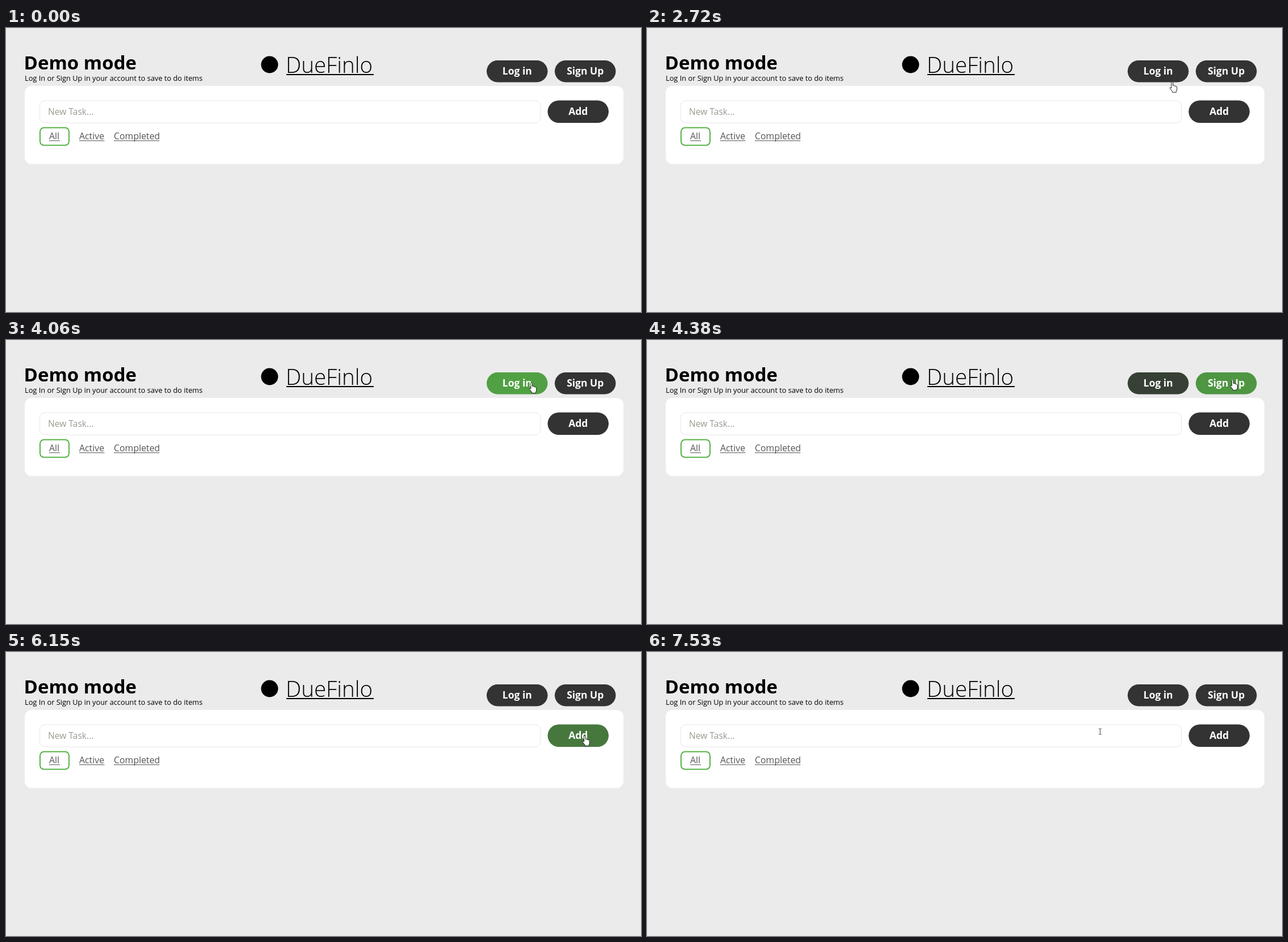
Recreate the animation shown at these times as an HTML page. Size 1119 by 500 pixels, loop 8 s.

```html
<!DOCTYPE html>
<html lang="en">
<head>
<meta charset="utf-8">
<title>Task list</title>
<style>
  html, body { margin: 0; width: 100%; height: 100%; overflow: hidden; background: #ebebeb; }
  svg { display: block; width: 100%; height: 100%; font-family: "Open Sans", "Noto Sans", sans-serif; }
  .button text { font-size: 17.5px; font-weight: 700; fill: #fff; text-anchor: middle; }
  .link { font-size: 15.9px; }
  .cursor path { fill: #fff; stroke: #1c1c1c; stroke-width: 1; stroke-linejoin: round; }
  .cursor #beam { fill: none; stroke: #444; }
</style>
</head>
<body>
<svg id="stage" viewBox="0 0 1119 500">
  <rect width="1119" height="500" fill="#ebebeb"/>
  <text x="31.5" y="73" font-size="33" font-weight="700">Demo mode</text>
  <text x="33" y="92.5" font-size="12.8">Log In or Sign Up in your account to save to do items</text>
  <circle cx="464.5" cy="64.5" r="15"/>
  <text x="493" y="79" font-size="38.5" font-weight="300">DueFinlo</text>
  <rect x="494" y="81" width="154" height="2"/>

  <rect x="33" y="102" width="1055" height="137.5" rx="12" fill="#fff"/>
  <rect x="59.5" y="128" width="882" height="39" rx="9" fill="#fff" stroke="#e6e6e6"/>
  <text x="74" y="153" font-size="15.6" fill="#9a9c92">New Task...</text>
  <rect id="caret" x="75" y="138" width="1" height="19"/>
  <rect x="60" y="175.5" width="51" height="31" rx="7" fill="none" stroke="#56b146" stroke-width="2"/>
  <g id="controls"></g>

  <g id="cursor" class="cursor">
    <path id="arrow" d="M.5.5V12.8L3.2 10.3 5 14.3 6.9 13.4 5.2 9.5H8.9Z"/>
    <path id="hand" d="M-1.4 11V1.4a1.4 1.4 0 0 1 2.8 0V6.4q2.4-.8 2.6.8q2.2-.6 2.4.8q2-.2 2 1.4V13q0 2.4-1.3 4V18.3H.4V17L-3.8 11.6q-.6-1.7.9-1.9z"/>
    <path id="beam" d="M-2.5-5H-.8L0-4.4 .8-5H2.5M0-4.4V4.4M-2.5 5H-.8L0 4.4 .8 5H2.5"/>
  </g>
</svg>
<script>
const LOOP = 8000, STEP = 10, FADE = 300;
const GREEN = [86, 177, 70];
const byId = id => document.getElementById(id);

// Pointer route: time, x, y
const route = [
  [980, 983, 250], [1350, 700, 309], [1720, 491, 259], [1780, 389, 218], [2020, 176, 120],
  [2200, 260, 84], [2610, 764, 110], [2840, 1030, 78], [3060, 1020, 162], [3260, 740, 264],
  [3340, 608, 255], [3440, 497, 248], [3540, 457, 190], [3840, 850, 82], [4145, 953, 73],
  [4178, 967, 72], [4380, 1032, 70], [4560, 1031, 72], [4660, 1028, 130], [4950, 1000, 155],
  [4992, 955, 160], [5040, 692, 168], [5060, 620, 172], [5300, 320, 206], [5560, 152, 200],
  [5850, 150, 190], [5997, 955, 152], [6150, 1020, 147], [6420, 1019, 154], [6550, 1019, 154],
  [6740, 950, 150], [6950, 790.5, 147], [7220, 790.5, 147], [7280, 798.5, 140], [LOOP, 798.5, 140]
];

const slope = (i, axis) => {
  const a = route[i], b = route[i + 1];
  return a && b ? (b[axis] - a[axis]) / (b[0] - a[0]) : 0;
};
const tangent = (i, axis) => {
  const a = slope(i - 1, axis), b = slope(i, axis);
  return a * b > 0 ? 2 * a * b / (a + b) : 0;
};

// Smooth route without overshoot
function pointer(t) {
  if (t < route[0][0]) return null;
  let i = 0;
  while (i < route.length - 2 && route[i + 1][0] <= t) i++;
  const a = route[i], b = route[i + 1], span = b[0] - a[0], u = (t - a[0]) / span;
  return [1, 2].map(k =>
    a[k] + (b[k] - a[k]) * u * u * (3 - 2 * u) +
    span * u * (1 - u) * (tangent(i, k) * (1 - u) - tangent(i + 1, k) * u));
}

function add(parent, tag, attrs, text = "") {
  const node = document.createElementNS("http://www.w3.org/2000/svg", tag);
  for (const key in attrs) node.setAttribute(key, attrs[key]);
  node.textContent = text;
  return parent.appendChild(node);
}

const controls = [];
function control(label, x, y, w, h, base, draw) {
  const group = add(byId("controls"), "g", {});
  draw(group, label, x, y, w, h);
  controls.push({ group, box: [x, y, w, h], base, levels: [] });
}
function drawButton(g, label, x, y, w, h) {
  g.setAttribute("class", "button");
  add(g, "rect", { x, y, width: w, height: h, rx: h / 2 });
  add(g, "text", { x: x + w / 2, y: y + h / 2 + 6.2 }, label);
}
function drawLink(g, label, x, y, w) {
  g.setAttribute("class", "link");
  add(g, "text", { x, y: y + 15 }, label);
  add(g, "rect", { x, y: y + 17, width: w, height: 1 });
}
const button = (label, x, y, h) => control(label, x, y, 107.5, h, 51, drawButton);
const link = (label, x, w) => control(label, x, 181, w, 20, 85, drawLink);
button("Log in", 847, 57, 38.5);
button("Sign Up", 967, 57, 38.5);
button("Add", 954.5, 127.5, 39.5);
link("All", 76, 19);
link("Active", 129, 44.5);
link("Completed", 190, 80.5);

const inside = (p, [x, y, w, h]) =>
  p && p[0] >= x && p[0] <= x + w && p[1] >= y && p[1] <= y + h;

// Hover progress of each control over the loop
for (const c of controls) {
  let level = 0;
  for (let t = 0; t <= LOOP; t += STEP) {
    level += (inside(pointer(t), c.box) ? 1 : -1) * STEP / FADE;
    level = Math.max(0, Math.min(1, level));
    c.levels.push(level);
  }
}

const show = (id, on) => byId(id).setAttribute("visibility", on ? "visible" : "hidden");

function draw(now) {
  const t = now % LOOP, p = pointer(t);
  for (const c of controls) {
    const u = c.levels[Math.floor(t / STEP)], k = u * u * (3 - 2 * u);
    const mix = GREEN.map(v => Math.round(c.base + (v - c.base) * k));
    c.group.setAttribute("fill", `rgb(${mix})`);
  }
  const shape = !p ? "" : controls.some(c => inside(p, c.box)) ? "hand" :
    inside(p, [59, 127.5, 883, 39.5]) ? "beam" : "arrow";
  for (const id of ["arrow", "hand", "beam"]) show(id, id === shape);
  if (p) byId("cursor").setAttribute("transform", `translate(${p})`);
  show("caret", t >= 7030 && t < 7530);
}

const start = performance.now();
function tick() {
  draw(Math.max(0, performance.now() - start));
  requestAnimationFrame(tick);
}
tick();
</script>
</body>
</html>
```
